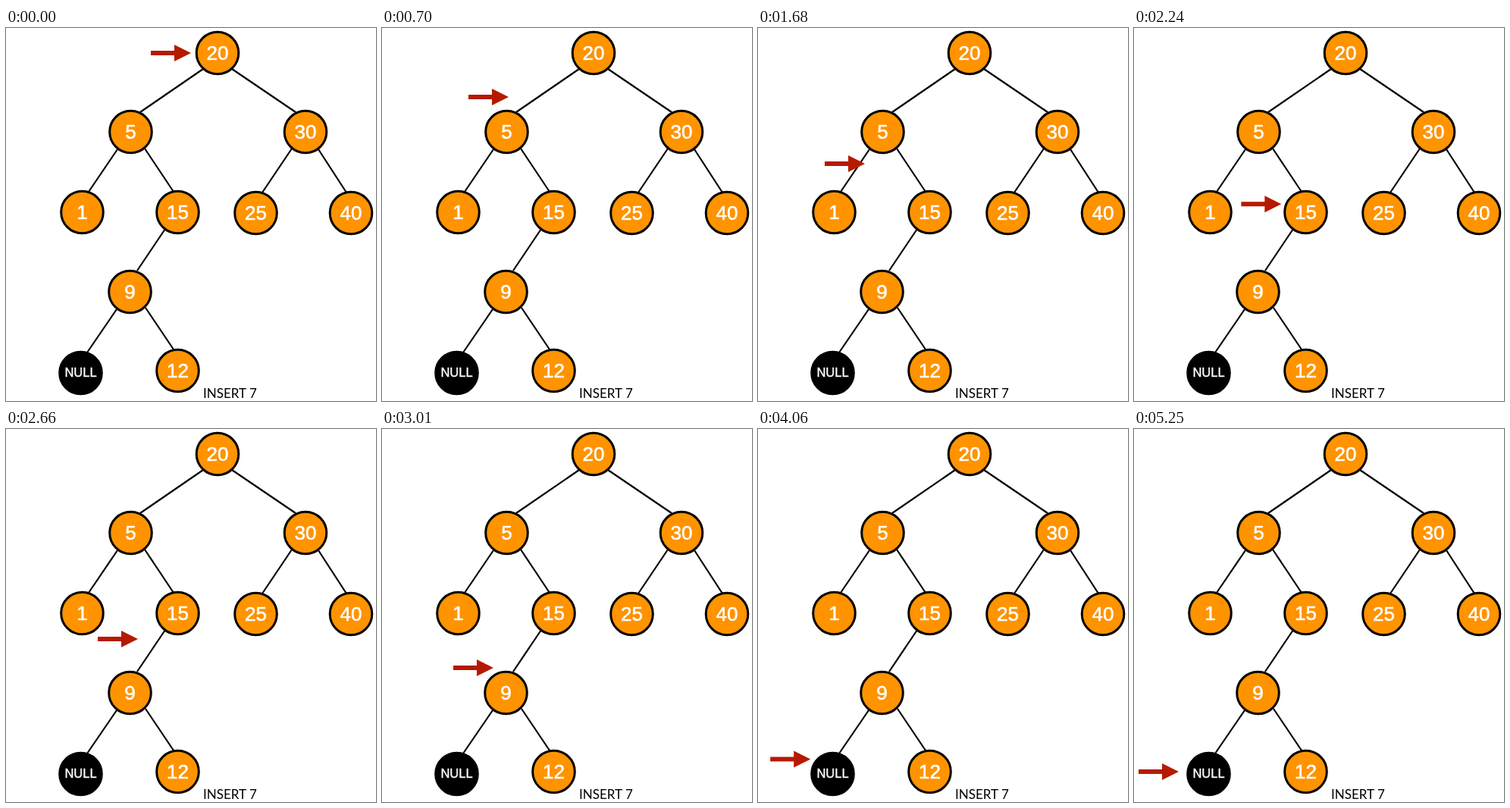
An HTML page that plays this animation: 488x492 px, repeating every 5.32 s.

```html
<!DOCTYPE html>
<html lang="en">
<head>
<meta charset="utf-8">
<title>Binary search tree insert</title>
<style>
  html, body { margin: 0; width: 100%; height: 100%; overflow: hidden; background: #fff; }
  svg { display: block; width: 100%; height: 100%; }
  line { stroke: #000; stroke-width: 2.2; }
  circle { fill: #ff9300; stroke: #000; stroke-width: 3; }
  .node text {
    font: 26px "Liberation Sans", Arial, sans-serif;
    fill: #fff; stroke: #fff; stroke-width: .6; text-anchor: middle;
  }
  .null circle { fill: #000; }
  .null text { font-size: 16.5px; stroke-width: .4; }
  .label { font: 17px Lato, sans-serif; }
</style>
</head>
<body>
<svg viewBox="0 0 488 492">
  <g id="edges"></g>
  <g id="nodes"></g>
  <text class="label" x="260" y="488">INSERT 7</text>
  <path id="arrow" fill="#b51a00" d="M0-3H31V-11L53 0L31 11V3H0Z"/>
</svg>
<script>
const STEP = 70, LOOP = 5320;

const nodes = [
  ["20", 279, 33], ["5", 164.5, 137], ["30", 395, 137],
  ["1", 100.5, 243], ["15", 226.5, 243], ["25", 329.5, 244], ["40", 455, 244],
  ["9", 163.5, 348], ["NULL", 98.5, 455], ["12", 226.5, 452]
];

const edges = [
  [260, 54, 177, 111], [298, 54, 382, 111],
  [147, 160, 109, 216], [183, 159, 221, 216],
  [377, 159, 338, 217], [412, 160, 449, 217],
  [210, 265, 173, 320],
  [146, 371, 107, 428], [184, 369, 221, 424]
];

// Arrow tail: step, x, y
const path = [
  [0, 191, 33], [10, 114, 91], [18, 52, 137], [24, 88, 179],
  [33, 148, 239], [43, 94, 315], [50, 57, 370], [60, 6, 452]
];

const byId = id => document.getElementById(id);

byId("edges").innerHTML = edges.map(([x1, y1, x2, y2]) =>
  `<line x1="${x1}" y1="${y1}" x2="${x2}" y2="${y2}"/>`).join("");

byId("nodes").innerHTML = nodes.map(([name, x, y]) => {
  const empty = name === "NULL";
  return `<g class="node${empty ? " null" : ""}">
    <circle cx="${x}" cy="${y}" r="27.8"/>
    <text x="${x}" y="${y + (empty ? 5 : 9)}">${name}</text></g>`;
}).join("");

function arrowAt(step) {
  const next = path.findIndex(p => p[0] > step);
  if (next < 0) return path[path.length - 1].slice(1);
  const [s0, x0, y0] = path[next - 1], [s1, x1, y1] = path[next];
  const k = (step - s0) / (s1 - s0);
  return [x0 + (x1 - x0) * k, y0 + (y1 - y0) * k];
}

function draw() {
  const step = Math.floor(performance.now() % LOOP / STEP);
  byId("arrow").setAttribute("transform", `translate(${arrowAt(step)})`);
  requestAnimationFrame(draw);
}
draw();
</script>
</body>
</html>
```
